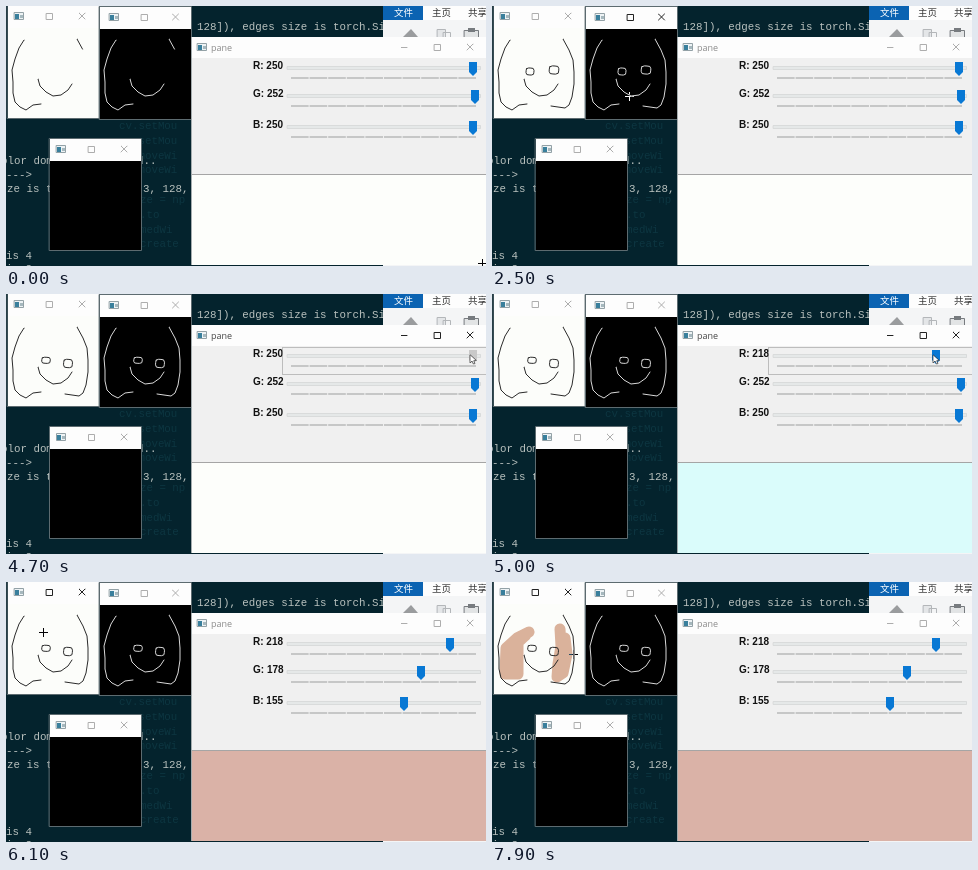
Animation, 480 px wide and 260 px high, one loop 8 s. Source, as an HTML page with a canvas:

```html
<!DOCTYPE html>
<html lang="en">
<head>
<meta charset="utf-8">
<title>Sketch and colour panel</title>
<style>
html, body { margin: 0; width: 100%; height: 100%; overflow: hidden; background: #04232d; }
canvas { display: block; }
</style>
</head>
<body>
<canvas id="stage" width="480" height="260"></canvas>
<script>
const g = document.getElementById('stage').getContext('2d');
const LOOP = 8000, STEP = 100, PAD = 92; // PAD: shift from paper window to pad window
const MONO = '10.8px "Liberation Mono", monospace';

const clamp = v => Math.max(0, Math.min(1, v));
const mix = (a, b, p) => a + (b - a) * p;
const shift = (pts, dx) => pts.map(([x, y]) => [x + dx, y]);

// Linear value through [time, value] pairs
function key(t, keys) {
  let [t0, v0] = keys[0];
  for (const [t1, v1] of keys) {
    if (t < t1) return mix(v0, v1, clamp((t - t0) / (t1 - t0)));
    [t0, v0] = [t1, v1];
  }
  return v0;
}

// First share p of a polyline, by length
function part(pts, p) {
  const len = (a, b) => Math.hypot(b[0] - a[0], b[1] - a[1]);
  let left = 0;
  for (let i = 1; i < pts.length; i++) left += len(pts[i - 1], pts[i]);
  left *= clamp(p);
  const out = [pts[0]];
  for (let i = 1; i < pts.length && left > 0; i++) {
    const a = pts[i - 1], b = pts[i], d = len(a, b), k = d ? Math.min(1, left / d) : 1;
    out.push([mix(a[0], b[0], k), mix(a[1], b[1], k)]);
    left -= d;
  }
  return out;
}

function eye(x, y, rx, ry) {
  return Array.from({ length: 13 }, (_, i) => {
    const a = i * Math.PI / 6 - 2.4, r = 1 + .1 * Math.cos(4 * a + 3);
    return [x + rx * r * Math.cos(a), y + ry * r * Math.sin(a)];
  });
}

const hair = [[18,34],[13,42],[9,53],[6,64],[7,76],[7,87],[9,96],[14,101],[20,104],[27,99],[35,98]];
const side = [[71,33],[77,44],[81,54],[82,66],[82,78],[80,91],[77,99],[73,102],[66,101],[59,100]];
const mouth = [[32,73],[34,80],[40,86],[47,90],[55,89],[62,84],[66,78]];

const ink = (from, to, pts, gone) => ({ from, to, pts, gone, kind: 'ink', path: shift(pts, PAD) });
const paint = (from, to, pts) => ({ from, to, pts, kind: 'paint', path: pts });
const move = (from, to, ...path) => ({ from, to, path });

const acts = [
  ink(-150, 1000, side),
  move(1050, 1100, [150,101], [147,97]),
  ink(1300, 1700, eye(38, 65.5, 4.3, 3.8), 3100),
  ink(1800, 2200, eye(62, 64, 5.2, 4.4), 2800),
  move(2500, 2550, [137,90], [139,88]),
  move(2800, 3000, [150,60], [158,68]),
  move(3100, 3300, [127,62], [134,69]),
  ink(3400, 3700, eye(40, 66.3, 4.6, 3.3)),
  ink(3800, 4200, eye(62, 69.5, 4.8, 4.5)),
  move(4600, 4700, [464,61], [464,61]),
  move(4710, 5000, [464,61], [441,61]),
  move(5100, 5300, [467,90], [414,90]),
  move(5390, 5400, [466,123], [466,123]),
  move(5401, 5500, [466,123], [411,123]),
  move(5501, 5700, [411,123], [397,123]),
  paint(6100, 6800, [[37,50],[25,56],[14,66],[13,92],[26,92],[26,60],[34,53],[20,66],[20,90]]),
  move(6900, 6910, [115,79], [115,79]),
  paint(7200, 7800, [[68,47],[69,64],[66,82],[65,95],[71,91],[75,72],[73,56]]),
  move(7900, 8000, [81,72], [81,72])
];

function pointer(t) {
  if (t < STEP) return [476, 257];
  let last = acts[0].path[0], end = 0;
  for (const a of acts) {
    if (t < a.from) {
      const p = (t - end) / (a.from - end), b = a.path[0];
      return [mix(last[0], b[0], p), mix(last[1], b[1], p)];
    }
    if (t <= a.to) return part(a.path, (t - a.from) / (a.to - a.from)).pop();
    last = a.path[a.path.length - 1];
    end = a.to;
  }
  return last;
}

function box(x, y, w, h, fill) {
  g.fillStyle = fill;
  g.fillRect(x, y, w, h);
}

function frame(x, y, w, h, color) {
  g.strokeStyle = color;
  g.lineWidth = 1;
  g.strokeRect(x + .5, y + .5, w - 1, h - 1);
}

function line(pts, color, width = 1, close) {
  g.beginPath();
  pts.forEach(p => g.lineTo(...p));
  if (close) g.closePath();
  g.strokeStyle = color;
  g.lineWidth = width;
  g.lineCap = g.lineJoin = 'round';
  g.stroke();
}

function shape(pts, color) {
  g.beginPath();
  pts.forEach(p => g.lineTo(...p));
  g.fillStyle = color;
  g.fill();
}

function text(s, x, y, color, font) {
  g.font = font;
  g.fillStyle = color;
  g.fillText(s, x, y);
}

function desktop() {
  box(0, 0, 480, 260, '#04232d');
  [['128]), edges size is torch.Size', 191, 24], ['olor domain is changed..', -5, 158],
   ['--->', 0, 172], ['ze is torch.Size([1, 3, 128,', 1, 186], ['is 4', 0, 253], ['is 3', 0, 266]]
    .forEach(([s, x, y]) => text(s, x, y, '#b9c1be', MONO));
  ['cv.setMou', 'cv.setMou', 'cv.moveWi', 'cv.moveWi', '', 'size = np', 'im.to', 'namedWi', '# create']
    .forEach((s, i) => text(s, 113 + (i > 4 ? 8 : 0), 123 + i * 14.8, '#0d3641', MONO));

  box(377, 0, 103, 260, '#f4f5f6');
  box(377, 0, 103, 14, '#fdfdfd');
  box(377, 0, 40, 14, '#0b63b2');
  const cjk = '9.5px "Noto Sans CJK SC", "Noto Sans CJK", sans-serif';
  text('文件', 388, 10, '#fff', cjk);
  text('主页', 426, 10, '#333', cjk);
  text('共享', 462, 10, '#333', cjk);
  shape([[397,31],[405,23],[412,31]], '#9a9c9e');
  box(431, 24, 9, 7, '#e4e6e8');
  frame(431, 23, 9, 9, '#b3b6b9');
  frame(437, 26, 8, 6, '#b3b6b9');
  box(458, 24, 15, 7, '#e2e4e5');
  frame(458, 24, 15, 8, '#777b7f');
  box(462, 22, 7, 4, '#777b7f');
}

function icon(x, y) {
  box(x, y, 10, 8, '#eef3f5');
  box(x + 1, y + 2, 4, 5, '#397f9c');
  box(x + 6, y + 3, 3, 3, '#a6b8be');
  frame(x, y, 10, 8, '#93a1a6');
}

function buttons(square, cross, y, active) {
  const c = active ? '#222' : '#adadad';
  frame(square - 3, y - 3, 7, 7, c);
  line([[cross - 3, y - 3], [cross + 3, y + 3]], c);
  line([[cross + 3, y - 3], [cross - 3, y + 3]], c);
}

function small(x, y, h, fill, active, dx = 0) {
  frame(x - 1, y - 1, 93, h + 2, '#5d6b70');
  box(x, y, 91, 22, '#fdfdfd');
  box(x, y + 22, 91, h - 22, fill);
  icon(x + 6 + dx, y + 6);
  buttons(x + 41 + dx, x + 74 + dx / 2, y + 10, active);
}

function sketch(t, dx, color) {
  const draw = (pts, p) => p > 0 && line(shift(part(pts, p), dx), color);
  draw(hair, 1);
  draw(mouth, 1);
  for (const a of acts) {
    if (a.kind !== 'ink') continue;
    const wiped = a.gone ? clamp((t - a.gone) / 200) : 0;
    draw(a.pts, Math.min((t - a.from) / (a.to - a.from), 1 - wiped));
  }
}

function slider(name, value, y, held) {
  const v = Math.round(value), x = Math.round(285.6 + .726 * value);
  text(`${name}: ${v}`, 247, y + 1, '#111', 'bold 10px "Liberation Sans", Arial, sans-serif');
  box(281, y - 2, 194, 4, '#e5e8e8');
  frame(281, y - 2, 194, 4, '#d9dbdb');
  for (let i = 0; i < 10; i++) box(285 + i * 18.6, y + 9, 17.6, 2, '#c6c7c7');
  shape([[x-4,y-6],[x+4,y-6],[x+4,y+4],[x,y+8],[x-4,y+4]], held ? '#c9c9c9' : '#0878d4');
}

function pane(t, active) {
  const r = key(t, [[4710,250],[5000,218]]);
  const gr = key(t, [[5100,252],[5300,178]]);
  const b = key(t, [[5400,250],[5500,175],[5700,155]]);
  box(185, 31, 295, 228, '#f0f0f0');
  box(186, 31, 294, 21, '#fdfdfd');
  icon(191, 37);
  text('pane', 205, 45, active ? '#444' : '#8a8a8a', '9px "Open Sans", "Noto Sans", sans-serif');
  line([[395, 41.5], [401, 41.5]], active ? '#222' : '#adadad');
  buttons(431, 464, 41, active);
  slider('R', r, 62, t >= 4700 && t < 5000);
  slider('G', gr, 90, t >= 5100 && t < 5300);
  slider('B', b, 121, t >= 5400 && t < 5700);
  if (t >= 4700 && t < 5100) {
    g.setLineDash([1, 1]);
    g.lineCap = 'butt';
    frame(276, 53, 205, 28, '#888');
    g.setLineDash([]);
  }
  const fill = t < 4710 ? '#fdfefb' : `rgb(${r},${gr},${(gr + b) / 2})`;
  box(186, 168, 294, 91, fill);
  box(186, 168, 294, 1, '#a5a5a5');
  box(185, 31, 1, 228, '#a4acae');
}

function cursor(t) {
  const [x, y] = pointer(t).map(Math.round);
  if (t > 4300 && t < 6000) {
    const arrow = [[0,0],[0,8],[2,6],[3.5,9],[5,8.5],[3.7,5.7],[6,5.5]].map(p => [x + p[0], y + p[1]]);
    shape(arrow, '#fff');
    line(arrow, '#333', .7, true);
    return;
  }
  g.globalCompositeOperation = 'difference';
  box(x - 4, y, 9, 1, '#fff');
  box(x, y - 4, 1, 4, '#fff');
  box(x, y + 1, 1, 4, '#fff');
  g.globalCompositeOperation = 'source-over';
}

function draw(t) {
  const active = t < STEP ? '' : t < 4600 ? 'pad' : t < 6000 ? 'pane' : 'paper';
  desktop();
  small(2, 0, 112, '#fcfdfa', active === 'paper');
  for (const a of acts)
    if (a.kind === 'paint' && t > a.from)
      line(part(a.pts, (t - a.from) / (a.to - a.from)), '#dab29b', 11);
  sketch(t, 0, '#2a2a2a');
  small(94, 1, 112, '#000', active === 'pad', 3);
  sketch(t, PAD, '#d8d8d8');
  pane(t, active === 'pane');
  small(44, 133, 111, '#000', false);
  cursor(t);
}

function tick() {
  const t = performance.now() % LOOP;
  draw(Math.floor(t / STEP) * STEP);
  requestAnimationFrame(tick);
}
tick();
</script>
</body>
</html>
```
